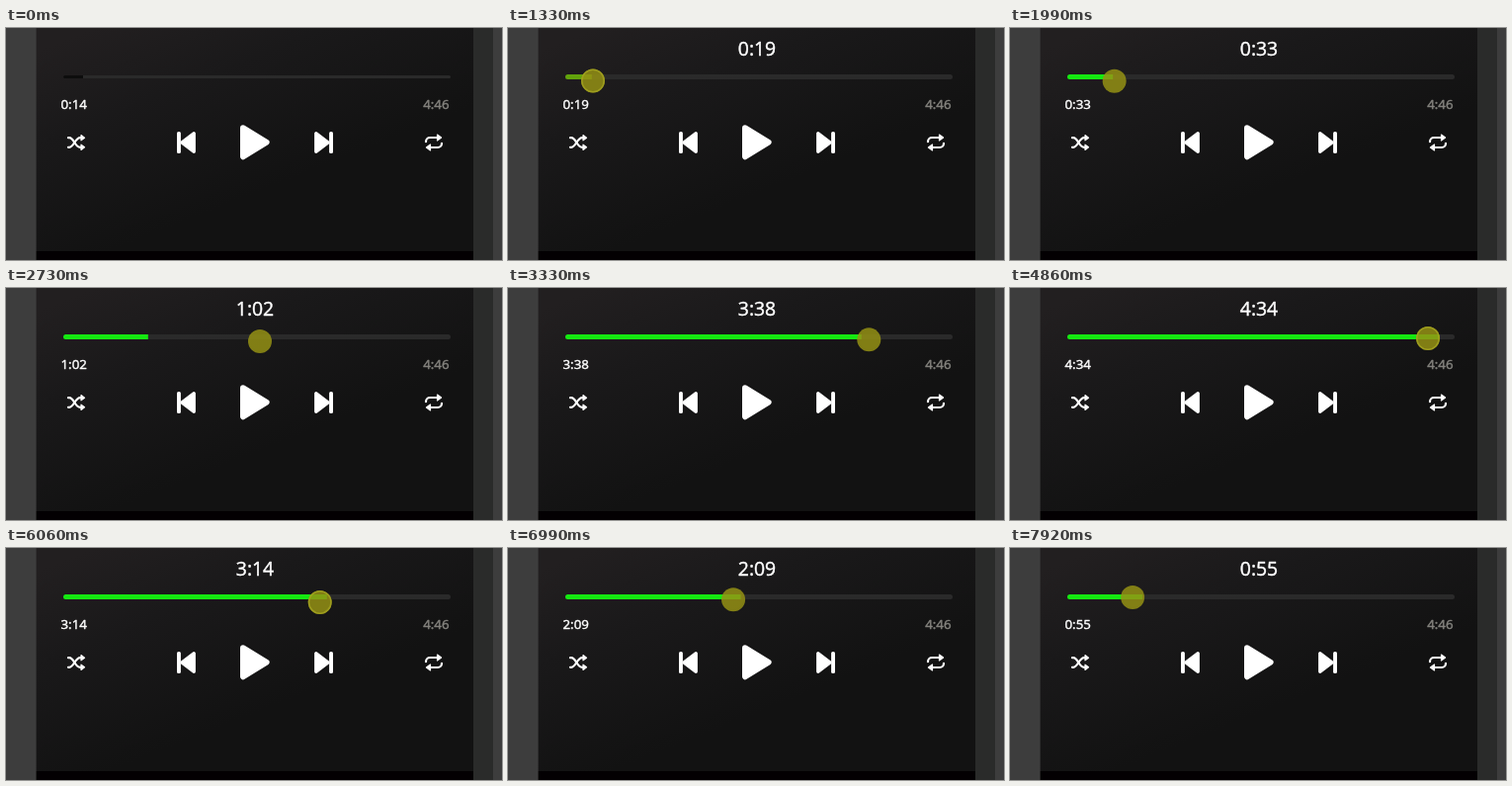
An HTML page with a canvas for the animation above (7.99 s loop, 502x235 px).

```html
<!DOCTYPE html>
<html lang="en">
<head>
<meta charset="utf-8">
<title>Seek bar</title>
<style>
html, body { margin: 0; width: 100%; height: 100%; overflow: hidden; background: #3d3d3d; }
canvas { display: block; width: 502px; height: 235px; }
</style>
</head>
<body>
<canvas id="stage"></canvas>
<script>
const W = 502, H = 235, LOOP = 7990, STEP = LOOP / 120;
const BAR = { x: 58, y: 49.5, w: 392 }, TOTAL = 286, START = 14;
const SHOW = 2, PRESS = 15;
const FONT = '"Open Sans", "Noto Sans", sans-serif';

const canvas = document.getElementById('stage');
const ctx = canvas.getContext('2d');
const dpr = window.devicePixelRatio || 1;
canvas.width = W * dpr;
canvas.height = H * dpr;

const path = [
  { n: 2, x: 285, y: 179 },
  { n: 14, x: 76, y: 54 },
  { n: 19, x: 84, y: 53.5 },
  { n: 40, x: 143, y: 54 },
  { n: 41, x: 257, y: 54 },
  { n: 58, x: 413, y: 51 },
  { n: 67, x: 441, y: 51 },
  { n: 72, x: 433.6, y: 51 },
  { n: 73, x: 423, y: 51 },
  { n: 90, x: 324, y: 55 },
  { n: 118, x: 133.4, y: 50 },
  { n: 120, x: 114, y: 50 }
];
const pulses = [18, 71, 89];

const ramp = (n, from, to) => Math.min(1, Math.max(0, (n - from) / (to - from)));

// Monotone cubic through the turning points.
function pointer(n, axis) {
  const last = path.length - 1;
  let i = 0;
  while (i < last - 1 && path[i + 1].n < n) i++;
  const slope = k => (path[k + 1][axis] - path[k][axis]) / (path[k + 1].n - path[k].n);
  const tangent = k => {
    const a = slope(Math.max(k - 1, 0)), b = slope(Math.min(k, last - 1));
    return a * b <= 0 ? 0 : 2 * a * b / (a + b);
  };
  const p = path[i], q = path[i + 1], d = q.n - p.n;
  const u = ramp(n, p.n, q.n), v = 1 - u;
  return v * v * ((1 + 2 * u) * p[axis] + u * d * tangent(i))
    + u * u * ((1 + 2 * v) * q[axis] - v * d * tangent(i + 1));
}

function rect(x, y, w, h, color) {
  ctx.fillStyle = color;
  ctx.fillRect(x, y, w, h);
}

function bar(w, h, endRadius, color) {
  const r = h / 2;
  ctx.fillStyle = color;
  ctx.beginPath();
  ctx.roundRect(BAR.x, BAR.y - r, w, h, [r, endRadius, endRadius, r]);
  ctx.fill();
}

// A hairline outline gives the digits their slightly heavier weight.
function text(str, x, y, size, align, color) {
  ctx.font = `${size}px ${FONT}`;
  ctx.textAlign = align;
  ctx.fillStyle = ctx.strokeStyle = color;
  ctx.lineWidth = .45;
  ctx.fillText(str, x, y);
  ctx.strokeText(str, x, y);
}

function clock(x) {
  const s = Math.round((x - BAR.x) / BAR.w * TOTAL);
  return Math.floor(s / 60) + ':' + String(s % 60).padStart(2, '0');
}

// Filled triangle with corners softened by a round stroke.
function softTriangle(d, round) {
  const p = new Path2D(d);
  ctx.lineJoin = 'round';
  ctx.lineWidth = round;
  ctx.fill(p);
  ctx.stroke(p);
}

function at(x, y, sx, sy, draw) {
  ctx.save();
  ctx.translate(x, y);
  ctx.scale(sx, sy);
  draw();
  ctx.restore();
}

function line(d) {
  ctx.lineCap = 'round';
  ctx.lineWidth = 2.2;
  ctx.stroke(new Path2D(d));
}

function skipIcon() {
  ctx.beginPath();
  ctx.roundRect(-9.5, -11, 3.9, 22, 1.6);
  ctx.fill();
  softTriangle('M-4.2 0 L7.6 -9.2 V9.2 Z', 3.6);
}

function shuffleHalf() {
  line('M-8 -4.8 H-6.8 C-2.5 -4.8 -1 4.8 4 4.8 H5');
  softTriangle('M5 2.2 L8.5 4.8 L5 7.4 Z', 1.2);
}

function repeatHalf() {
  line('M-8 -.8 V-1 A4 4 0 0 1 -4 -5 H4');
  softTriangle('M3.5 -8 L7.6 -5 L3.5 -2 Z', 1.2);
}

function drawPanel() {
  rect(0, 0, W, H, '#3d3d3d');
  rect(473, 0, 20, H, '#2a2b2a');
  const shade = ctx.createLinearGradient(90, 0, 170, 200);
  shade.addColorStop(0, '#221f20');
  shade.addColorStop(.4, '#1a191a');
  shade.addColorStop(1, '#121212');
  rect(30.6, 0, 442.4, 226, shade);
  rect(30.6, 226, 442.4, 9, '#030002');
}

function drawButtons() {
  ctx.fillStyle = ctx.strokeStyle = '#fff';
  at(71, 116, 1, 1, shuffleHalf);
  at(71, 116, 1, -1, shuffleHalf);
  at(182.5, 116, 1, 1, skipIcon);
  softTriangle('M240 101.3 L263.6 115.8 L240 130.3 Z', 6);
  at(321.5, 116, -1, 1, skipIcon);
  at(433, 116, 1, 1, repeatHalf);
  at(433, 116, -1, -1, repeatHalf);
}

function drawCursor(n) {
  const x = pointer(n, 'x'), y = pointer(n, 'y');
  const ring = Math.max(...pulses.map(p => n < p ? 0 : 1 - ramp(n, p, p + 10)));
  ctx.fillStyle = 'rgba(150,146,20,.84)';
  ctx.beginPath();
  ctx.arc(x, y, 12, 0, 7);
  ctx.fill();
  ctx.strokeStyle = `rgba(165,165,32,${ring})`;
  ctx.lineWidth = 1.5;
  ctx.beginPath();
  ctx.arc(x, y, 11.2, 0, 7);
  ctx.stroke();
}

function draw(n) {
  ctx.setTransform(dpr, 0, 0, dpr, 0, 0);
  const pressed = n >= PRESS;
  // The slider follows the pointer one step late.
  const end = pressed ? pointer(n - 1, 'x') : BAR.x + START / TOTAL * BAR.w;
  const grow = ramp(n, PRESS - 1, PRESS + 2);
  const thick = 3 + 2 * grow;
  const glow = ramp(n, PRESS, PRESS + 7.5);
  const sat = 86 * Math.min(1, 3 * glow);

  drawPanel();
  bar(BAR.w, thick, thick / 2, '#2a2a2a');
  bar(end - BAR.x + .8, thick, 0, `hsl(${20 + 99 * glow},${sat}%,${5 + 44 * glow}%)`);
  if (pressed) {
    ctx.globalAlpha = grow;
    text(clock(end), 252, 28, 19.4, 'center', '#fff');
    ctx.globalAlpha = 1;
  }
  text(clock(end), 55.5, 82, 13.3, 'left', '#fff');
  text('4:46', 448.5, 82, 13.3, 'right', '#85847f');
  drawButtons();
  if (n >= SHOW) drawCursor(n);
}

function tick() {
  const t = performance.now() % LOOP;
  draw(Math.floor((t + 9) / STEP) % 120);
  requestAnimationFrame(tick);
}
tick();
</script>
</body>
</html>
```
